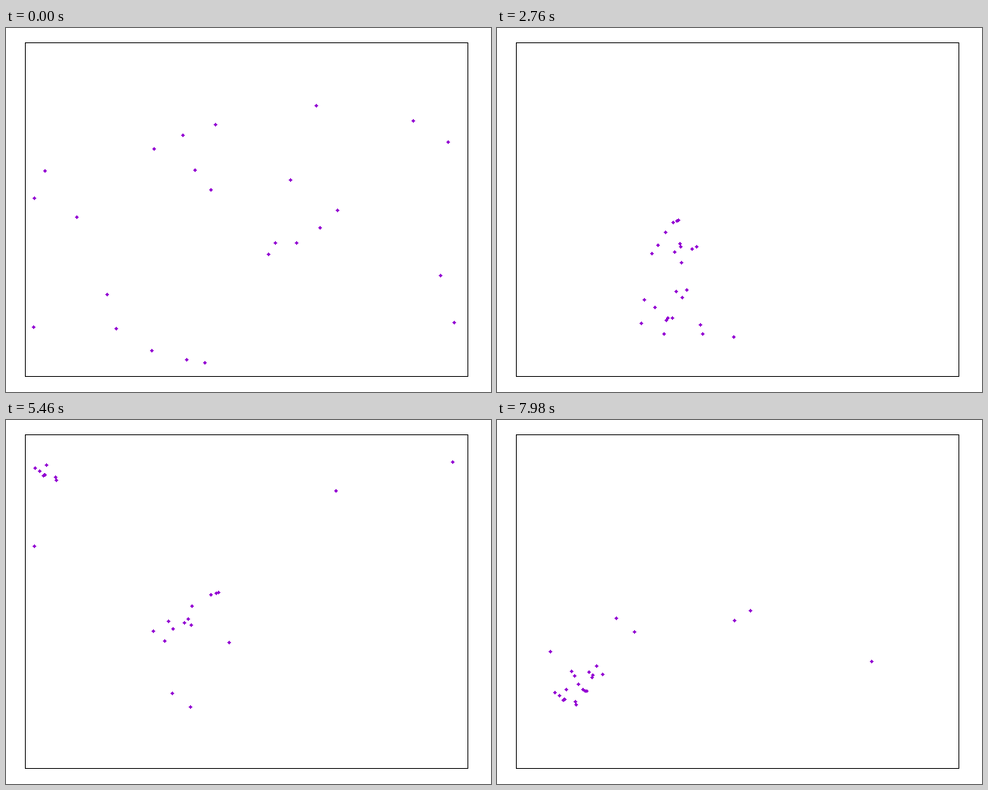
These frames come from a looping animation (640x480 px, 8 s). A matplotlib script:

```python
import numpy as np
import matplotlib.pyplot as plt
from matplotlib.animation import FuncAnimation

W, H = 640, 480
LEFT, TOP, RIGHT, BOTTOM = 25, 19, 609, 459
VIOLET = (148, 0, 211)
STEP, FRAMES = 20, 400
KEYS = np.array([0, 1.14, 2.76, 4.46, 5.46, 6.98, 7.98])


def bell(t, width):
    return np.exp(-(t / width) ** 2)


def spline(points):
    """A path through the points at the key times, smooth in acceleration."""
    pos = np.array(points, float)
    h = np.diff(KEYS)
    slope = np.diff(pos, axis=0) / h[:, None]
    n = len(KEYS)
    a, b = np.zeros((n, n)), np.zeros((n, 2))
    a[0, 0], b[0] = 1, 0.3 * slope[0]          # nearly at rest at the start
    for i in range(1, n - 1):
        p, q = 1 / h[i - 1], 1 / h[i]
        a[i, i - 1:i + 2] = p, 2 * (p + q), q
        b[i] = 3 * (p * slope[i - 1] + q * slope[i])
    a[-1, -2:], b[-1] = (1, 2), 3 * slope[-1]
    vel = np.linalg.solve(a, b)

    def at(t):
        i = min(np.searchsorted(KEYS, t, side="right") - 1, n - 2)
        s = (t - KEYS[i]) / h[i]
        rise = s * s * (3 - 2 * s)
        bend = h[i] * s * (1 - s) * ((1 - s) * vel[i] - s * vel[i + 1])
        return pos[i] * (1 - rise) + pos[i + 1] * rise + bend
    return at


def gather(t, width=1.95):
    """Birds close in on their centre until a small cloud is left."""
    scale = 0.07 + 0.93 * bell(t, width)
    return np.diag([scale, scale])


def swing(t):
    """Birds close in sideways, but overshoot and swing back in height."""
    across = gather(t, 1.4)[0, 0]
    upright = np.exp(-t / 4) * np.cos(2 * np.pi * t / 9)
    lean = 0.3 * bell(t - 5, 1.8)
    return np.array([[across, lean], [0, upright]])


class Flock:
    """Birds placed around a moving centre; paths may run past the edges."""

    def __init__(self, starts, path, shape=gather):
        starts = np.array(starts, float)
        centre = starts.mean(axis=0)
        self.offsets = starts - centre
        self.path = spline([centre, *path])
        self.shape = shape

    def places(self, t):
        return self.path(t) + self.offsets @ self.shape(t).T


flocks = [
    # the group that leaves by the floor
    Flock([(270, 213), (195, 159), (383, 283), (591, 388),
           (355, 283), (573, 326), (346, 298), (409, 102)],
          [(311, 298), (232, 377), (94, 416), (52, 510), (71, 671), (90, 806)]),
    # the swarm in the middle
    Flock([(51, 188), (93, 249), (375, 200), (437, 240), (414, 263), (133, 351),
           (192, 425), (238, 437), (262, 441), (537, 122), (621, 224)],
          [(293, 272), (233, 280), (204, 312), (239, 258), (228, 327), (118, 341)],
          swing),
    # a pair that loops above the swarm
    Flock([(276, 127), (620, 394)],
          [(381, 296), (278, 381), (131, 411), (231, 369), (245, 184), (169, 270)]),
    # single birds
    Flock([(233, 141)],
          [(223, 227), (220, 403), (298, 496), (435, 533), (424, 632), (313, 704)]),
    Flock([(249, 187)],
          [(214, 242), (190, 389), (56, 384), (5, 495), (-141, 618), (-250, 691)]),
    Flock([(145, 396)],
          [(220, 327), (250, 345), (480, 173), (621, 166), (757, 303), (654, 305)]),
    Flock([(583, 150)],
          [(457, 217), (263, 288), (186, 387), (294, 293), (348, 326), (494, 318)]),
]

CORNER = np.array([LEFT, TOP])
SIZE = np.array([RIGHT - LEFT, BOTTOM - TOP])

# offsets of a diamond five pixels across
DOT = np.array([(x, y) for x in range(-2, 3) for y in range(-2, 3)
                if abs(x) + abs(y) <= 2])


def picture(frame):
    t = frame * STEP / 1000
    birds = np.vstack([f.places(t) for f in flocks])
    birds = np.rint(CORNER + (birds - CORNER) % SIZE).astype(int)
    spots = (birds[:, None] + DOT).reshape(-1, 2)
    img = np.full((H, W, 3), 255, np.uint8)
    img[spots[:, 1], spots[:, 0]] = VIOLET
    img[[TOP, BOTTOM], LEFT:RIGHT + 1] = 0
    img[TOP:BOTTOM + 1, [LEFT, RIGHT]] = 0
    return img


fig = plt.figure(figsize=(W / 100, H / 100), dpi=100, facecolor="white")
ax = fig.add_axes([0, 0, 1, 1])
ax.axis("off")
stage = ax.imshow(picture(0), interpolation="nearest", aspect="auto")


def update(frame):
    stage.set_data(picture(frame))
    return [stage]


anim = FuncAnimation(fig, update, frames=FRAMES, interval=STEP,
                     repeat=True, repeat_delay=0)
plt.show()
```
